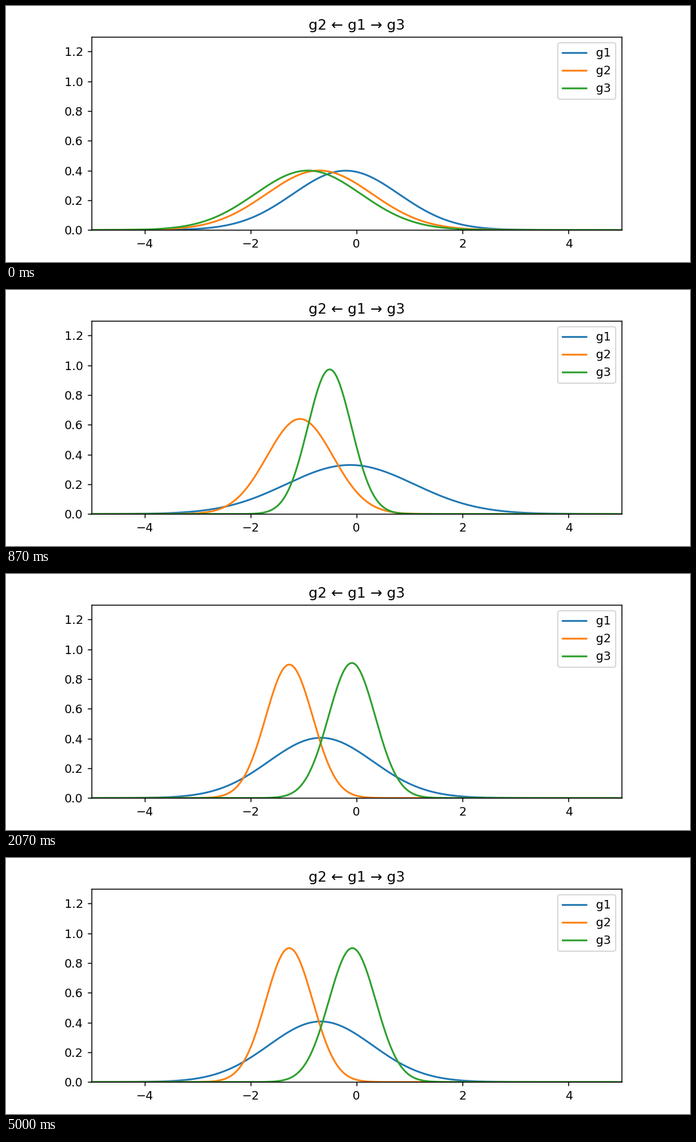
These frames come from a looping animation (1040 px wide and 390 px high, 5.07 s). A matplotlib script:

```python
import numpy as np
import matplotlib.pyplot as plt
from matplotlib.animation import FuncAnimation

FRAMES, LOOP_MS = 76, 5070


def ease(t, mid):
    """S-curve from 0 to 1, halfway at frame mid; later ones are slower."""
    return 1 / (1 + np.exp(-5.5 * (t / mid - 1)))


def curves(t):
    """Mean and width of g1, g2 and g3; all widths start at 1."""
    early, late, tail = ease(t, 4.5), ease(t, 16.2), ease(t, 21)
    g1 = (-0.2 + 0.268 * early - 0.746 * late,
          1 + 0.26 * early - 0.28 * ease(t, 18))
    g2 = (-0.7 - 0.306 * ease(t, 9) - 0.264 * ease(t, 15),
          1 - 0.315 * early - 0.242 * late)
    g3 = (-0.92 + 0.72 * ease(t, 12.5) + 0.12 * tail,
          1 - 0.612 * ease(t, 7.85) + 0.055 * tail)
    return g1, g2, g3


def bell(x, mean, width):
    return np.exp(-0.5 * ((x - mean) / width) ** 2) / (width * np.sqrt(2 * np.pi))


fig, ax = plt.subplots(figsize=(8, 3), dpi=130)
fig.subplots_adjust(left=0.125, right=0.9, bottom=0.125, top=0.88)
ax.set(xlim=(-5, 5), ylim=(0, 1.3), title="g2 ← g1 → g3")
ax.set_xticks(range(-4, 5, 2))
ax.set_yticks(np.arange(0, 1.3, 0.2))

x = np.linspace(-5, 5, 500)
lines = [ax.plot(x, 0 * x, label=f"g{n}")[0] for n in (1, 2, 3)]
ax.legend(loc="upper right")


def update(frame):
    for line, (mean, width) in zip(lines, curves(frame)):
        line.set_ydata(bell(x, mean, width))
    return lines


anim = FuncAnimation(fig, update, frames=FRAMES, interval=LOOP_MS / FRAMES,
                     repeat=True, repeat_delay=0)
plt.show()
```
